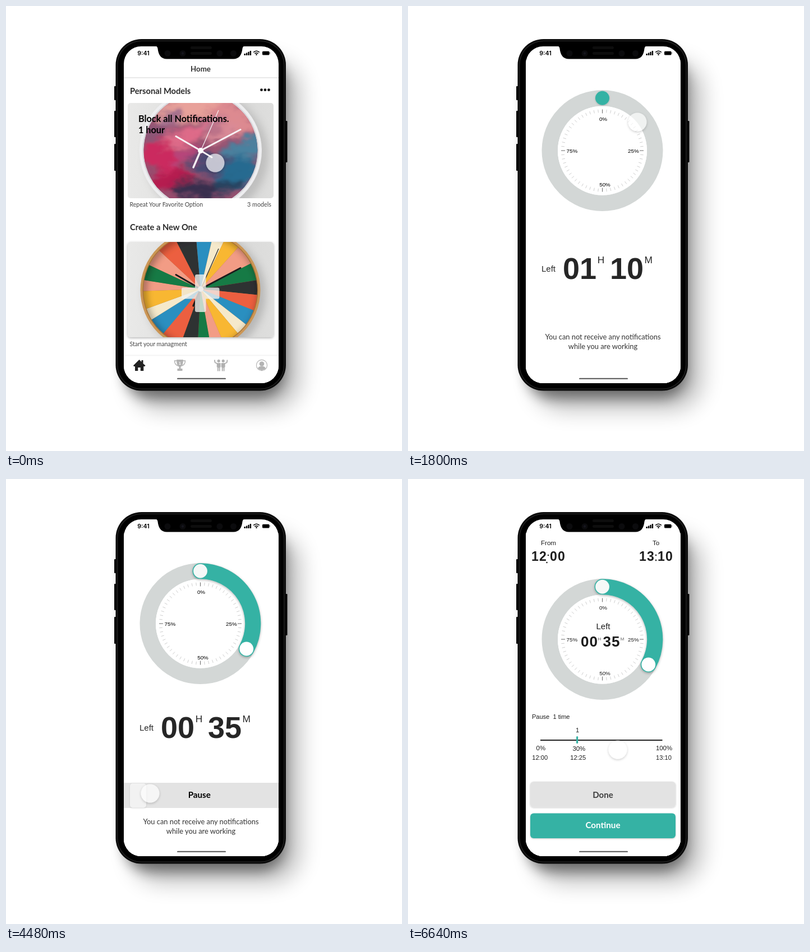
An HTML page that plays this animation: 706 by 794 pixels, repeating every 6680 ms.

```html
<!DOCTYPE html>
<html lang="en">
<head>
<meta charset="utf-8">
<title>Focus timer</title>
<style>
html, body { margin: 0; width: 100%; height: 100%; overflow: hidden; background: #fff; }
svg { display: block; width: 706px; height: 794px; }
.lato { font-family: Lato, sans-serif; }
.sans { font-family: "Liberation Sans", Arial, sans-serif; }
.bold { font-weight: 700; }
</style>
</head>
<body>
<svg id="stage" viewBox="0 0 706 794" xmlns="http://www.w3.org/2000/svg"></svg>
<script>
const LOOP = 6680, TEAL = '#35b2a4', INK = '#262626';
const CX = 346.5, CY = 258, RING = 93.75, SWEEP = 118.7;

const text = (x, y, size, str, cls = 'sans', extra = '') =>
  `<text x="${x}" y="${y}" font-size="${size}" class="${cls}" ${extra}>${str}</text>`;
const circle = (x, y, r, fill, extra = '') => `<circle cx="${x}" cy="${y}" r="${r}" fill="${fill}" ${extra}/>`;
const rect = (x, y, w, h, r, fill, extra = '') =>
  `<rect x="${x}" y="${y}" width="${w}" height="${h}" rx="${r}" fill="${fill}" ${extra}/>`;
const line = (x1, y1, x2, y2, w, color, extra = '') =>
  `<path d="M${x1} ${y1}L${x2} ${y2}" stroke="${color}" stroke-width="${w}" ${extra}/>`;
const middle = 'text-anchor="middle"', end = 'text-anchor="end"', round = 'stroke-linecap="round"';

function polar(deg, r, x = CX, y = CY) {
  const a = deg * Math.PI / 180;
  return [x + r * Math.sin(a), y - r * Math.cos(a)];
}
function arcPath(deg) {
  const [x, y] = polar(deg, RING);
  return `M${CX} ${CY - RING}A${RING} ${RING} 0 0 1 ${x} ${y}`;
}

function wedges() {
  const color = { d: '#2f3032', b: '#2c8fc0', c: '#f5e9cb', y: '#f8b732', p: '#f29c85', g: '#167a45', r: '#ec5f3f' };
  const order = 'dbcypgdrbcypgdrbcypgpr';
  const ends = [-5, 13, 26, 42, 63, 81, 96, 112, 128, 140, 157, 170, 183, 200, 220, 238, 250, 268, 279, 295, 313, 333];
  let from = -27;
  return ends.map((to, i) => {
    const a = polar(from, 120, 347, 505), b = polar(to, 120, 347, 505);
    from = to;
    return `<path d="M347 505L${a}L${b}Z" fill="${color[order[i]]}"/>`;
  }).join('');
}

function paintedFace() {
  const blob = (x, y, rx, ry, fill, tilt = 0) =>
    `<ellipse cx="${x}" cy="${y}" rx="${rx}" ry="${ry}" fill="${fill}" transform="rotate(${tilt} ${x} ${y})"/>`;
  return `<g clip-path="url(#face)">${circle(347, 258, 102, '#96506f')}<g filter="url(#wisps)">` +
    blob(330, 182, 62, 22, '#e8a19a', -10) + blob(405, 200, 42, 26, '#dd8a90', 30) +
    blob(290, 205, 26, 12, '#a5728f', -35) + blob(360, 212, 34, 10, '#c37b92', -20) +
    blob(264, 228, 24, 20, '#8d5476', -30) + blob(315, 235, 42, 17, '#de6a88', -20) +
    blob(385, 226, 40, 9, '#d98a97', -25) + blob(275, 270, 38, 24, '#cb2a5f', 20) +
    blob(320, 268, 26, 12, '#b8457a', -20) + blob(295, 312, 42, 20, '#b51d4f', -15) +
    blob(425, 255, 44, 20, '#4a819f', -20) + blob(375, 285, 48, 20, '#4a4a72', 8) +
    blob(415, 300, 36, 26, '#286a90', -30) + blob(345, 328, 48, 16, '#392f4e', 5) +
    blob(395, 322, 30, 12, '#28435f', -20) + '</g></g>';
}

function hands(color, cy) {
  return line(347, cy, 303, cy - 25.5, 3, color, round) + line(347, cy, 418, cy - 37.5, 3, color, round) +
    line(342, cy + 12, 379, cy - 72, 1.2, color) + line(347, cy, 334, cy + 30, 3.4, color, round);
}

function tabIcons() {
  const person = (x, side) => circle(x, 633.3, 2.6, '#b0b0b0') +
    `<path d="M${x - 3.4} 637h6.800v7.500h-1v7h-1.900v-6h-1v6h-1.900v-7h-1z" fill="#b0b0b0"/>
     <path d="M${x + side * 2.6} 638.300L${x + side * 6.6} 636l${side * 0.8} -4.500" fill="none" stroke="#b0b0b0" stroke-width="1.900"/>`;
  return `<path d="M227 641.5L237.5 631l4 4v-3h3v6l4 3.500-1.200 1.500h-2V651h-5.500v-6h-4.500v6H230v-8h-2z" fill="#222"/>
    <g fill="none" stroke="#b3b3b3" stroke-width="1.500"><path d="M304 633h-3.500q0 7 6 9M316 633h3.500q0 7-6 9"/></g>
    <path d="M304 631h12q0 11-4.500 13v3h3v4h-9v-4h3v-3Q304 642 304 631z" fill="#b3b3b3"/>
    ${text(310, 640, 7, '1', 'sans bold', middle + ' fill="#fff"')}
    ${person(379.2, -1)}${person(387.2, 1)}
    ${circle(456, 641, 9.6, 'none', 'stroke="#b3b3b3" stroke-width="1.100"')}
    ${circle(456, 638.5, 4.3, '#b3b3b3')}<path d="M449 647q1-4 5-4.300h4q4 .3 5 4.300-7 6-14 0z" fill="#b3b3b3"/>`;
}

function homePage() {
  return rect(210, 72, 276, 602, 0, '#fff') +
    text(347, 117, 13.3, 'Home', 'lato bold', middle + ' fill="#333"') +
    rect(210, 127.5, 276, 1, 0, '#d3d3d3') +
    text(221, 156.6, 14.7, 'Personal Models', 'lato bold', 'fill="#2b2b2b"') +
    [455.5, 462, 468.5].map(x => circle(x, 149.7, 2.4, '#111')).join('') +
    `<g clip-path="url(#card1)">${rect(217, 173, 260, 170, 0, 'url(#wall)')}
      ${circle(358, 266, 110, '#8b8b8b', 'opacity=".35" filter="url(#haze)"')}
      ${circle(347, 258, 109, '#eeeef0')}${circle(347, 258, 104, '#d9d8dc')}${paintedFace()}
      ${hands('#f7f1f4', 258)}${line(347, 258, 367, 270, 3, '#f7f1f4', round)}${circle(347, 258, 5, '#fff')}</g>` +
    text(236, 207, 16.2, 'Block all Notifications.', 'lato bold') +
    text(236, 227, 16.2, '1 hour', 'lato bold') +
    text(220.5, 358, 10.55, 'Repeat Your Favorite Option', 'lato', 'fill="#444"') +
    text(473, 358, 10.8, '3 models', 'lato', end + ' fill="#444"') +
    text(221, 399.6, 14.7, 'Create a New One', 'lato bold', 'fill="#2b2b2b"') +
    `<g filter="url(#lift)"><g clip-path="url(#card2)">${rect(217, 421, 260, 170, 0, 'url(#wall)')}
      ${circle(355, 514, 108, '#777', 'opacity=".35" filter="url(#haze)"')}
      ${circle(346.5, 507, 107, '#cb9656')}${circle(346.5, 507, 103, '#a87336')}
      <g clip-path="url(#wheel)">${wedges()}
      ${circle(350, 510, 107, 'none', 'stroke="#000" stroke-width="12" opacity=".4" filter="url(#haze)"')}</g>
      ${hands('#1c1c1c', 505)}${circle(347, 505, 5, '#ddd')}
      <path d="M340 479h13.500q3 0 3 3v20.500h21q3 0 3 3v14q0 3-3 3h-21V543q0 3-3 3H340q-3 0-3-3v-20.500h-21q-3 0-3-3v-14q0-3 3-3h21V482q0-3 3-3z" fill="#f3f3f0" opacity=".78"/>
    </g></g>` +
    text(220.5, 607, 10.55, 'Start your managment', 'lato', 'fill="#444"') +
    rect(210, 624.5, 276, 50, 0, '#fff', 'filter="url(#lift)"') + tabIcons();
}

function dial(arc) {
  let ticks = '';
  for (let i = 0; i < 60; i++) {
    const major = i % 15 === 0;
    ticks += line(...polar(i * 6, major ? 66.5 : 68), ...polar(i * 6, 73.5), major ? 0.9 : 0.7, major ? '#555' : '#b9b9b9');
  }
  return circle(CX, CY, RING, 'none', 'stroke="#d3d7d6" stroke-width="28.500"') + circle(CX, CY, 79.5, '#fff') + ticks +
    text(348, 205, 9.8, '0%', 'sans', middle) + text(351, 321.5, 9.8, '50%', 'sans', middle) +
    text(282.5, 261.5, 9.8, '75%') + text(392, 261.5, 9.8, '25%') + arc;
}
const arcShape = d => `<path d="${d}" fill="none" stroke="${TEAL}" stroke-width="28" ${round} filter="url(#lift)"/>`;
const knob = (x, y, fill = '#fff', id = '') => circle(x, y, 12.4, fill, id);

function timerPage() {
  const big = (x, str) => text(x, 487, 54, str, 'sans bold');
  const growing = circle(CX, CY - RING, 12.5, TEAL, 'filter="url(#soft)"') +
    `<g id="grow">${arcShape(arcPath(0.1)).replace('<path', '<path id="arc"')}
     ${knob(CX, CY - RING, '#f5f8f7')}${knob(CX, CY - RING, '#fff', 'id="tip"')}</g>`;
  return rect(210, 96, 276, 578, 0, '#fff') + dial(growing) +
    `<g id="counter" fill="${INK}">${text(238, 473.5, 15, 'Left')}${big(276, '0')}
      <g id="before">${big(306, '1')}${big(360, '10')}</g><g id="after">${big(306, '0')}${big(360, '35')}</g>
      ${text(337.8, 459, 17.3, 'H')}${text(421.5, 459, 17.3, 'M')}</g>
    <g id="bar">${rect(210, 542, 276, 45, 0, '#e3e3e3')}
      ${rect(221, 543, 29, 43.5, 5, '#fff', 'opacity=".55" filter="url(#soft)"')}
      ${text(344.8, 569, 15.2, 'Pause', 'lato bold', middle)}</g>
    <g id="note" fill="#333">${text(347.5, 595, 12.85, 'You can not receive any notifications', 'lato', middle)}
      ${text(347.5, 612, 12.85, 'while you are working', 'lato', middle)}</g>`;
}

function summaryPage() {
  const clock = (x, hour, min) => text(x, 146, 23, hour, 'sans bold', 'letter-spacing="1.2"') +
    text(x + 33, 146, 23, min, 'sans bold', 'letter-spacing="1.2"');
  const arc = arcShape(arcPath(SWEEP)) + knob(CX, CY - RING, '#f5f8f7') + knob(...polar(SWEEP, RING));
  const mid = (x, y, size, str) => text(x, y, size, str, 'sans', middle);
  return rect(210, 96, 276, 578, 0, '#fff') + `<g fill="#1c1c1c">` +
    mid(250.5, 118, 11.6, 'From') + mid(442, 118, 11.6, 'To') +
    clock(220, '12', '00') + circle(250, 136, 1.3, '#222') + circle(247.5, 149, 1.3, '#222') +
    clock(412, '13', '10') + circle(442, 136, 1.4, '#333') + circle(442, 145, 1.4, '#333') +
    `<g transform="translate(0 28)">${dial(arc)}</g>` +
    mid(348, 267.5, 15, 'Left') +
    text(308, 299, 26, '00', 'sans bold', 'letter-spacing="1"') + text(347.5, 299, 26, '35', 'sans bold', 'letter-spacing="1"') +
    text(338.5, 288, 8, 'H', 'sans', 'fill="#666"') + text(378.7, 288, 8, 'M', 'sans', 'fill="#666"') +
    text(221, 427.5, 11, 'Pause') + text(258.5, 427.5, 11, '1 time') +
    mid(302, 452, 11, '1') + line(236, 466, 453.5, 466, 2, '#222') + rect(300, 459, 3.2, 13, 1.5, TEAL) +
    mid(236.8, 484, 11.4, '0%') + mid(304.8, 485, 11.4, '30%') + mid(456.5, 484, 11.4, '100%') +
    mid(235.2, 501, 11.1, '12:00') + mid(303.2, 501, 11.1, '12:25') + mid(456, 501, 11.1, '13:10') +
    rect(218, 540, 259, 45.5, 6, '#e3e3e3', 'filter="url(#soft)"') +
    rect(218, 596.5, 259, 44.5, 6, TEAL, 'filter="url(#soft)"') +
    text(347.5, 569, 15, 'Done', 'lato bold', middle + ' fill="#3d3d3d"') +
    text(347.5, 623, 15.2, 'Continue', 'lato bold', middle + ' fill="#fff"') + '</g>';
}

function statusBar() {
  const bars = [3, 4.5, 6.2, 8].map((h, i) => rect(424.5 + i * 3.4, 88 - h, 2.4, h, 0.6, '#000')).join('');
  return text(245, 88.3, 10.7, '9:41', '', `${middle} font-family="Inter, sans-serif" font-weight="600"`) + bars +
    `<g fill="none" stroke="#000" stroke-width="1.500"><path d="M441.200 82.600q5.300-4.600 10.600 0M443.300 85q3.200-2.600 6.400 0"/></g>
    ${circle(446.5, 86.8, 1.3, '#000')}${rect(457, 80.8, 12.5, 6.6, 1.5, '#000')}${rect(470, 82.8, 1, 2.6, 0.4, '#777')}`;
}

function phone() {
  const button = (x, y, h) => rect(x, y, 4, h, 1, '#050505');
  return rect(226, 100, 296, 618, 50, '#000', 'opacity=".28" filter="url(#far)"') +
    rect(210, 90, 287, 610, 46, '#000', 'opacity=".42" filter="url(#near)"') +
    button(193, 143, 25) + button(193, 187, 47) + button(193, 246, 48) + button(497.5, 205, 74) +
    rect(195.5, 59, 303.5, 627.5, 46, '#0a0a0a') +
    rect(198.8, 62.3, 296.9, 620.9, 43, '#000', 'stroke="#262626" stroke-width="1.200"');
}

function notch() {
  return `<path d="M264 71q6 0 6.500 5 2 18.500 16 18.500h119q14 0 16-18.500 .5-5 6.500-5z" fill="#000"/>` +
    [288, 315, 381, 405.5].map(x => circle(x, 84.5, 5.5, '#0b0b0d')).join('') + circle(315, 84.5, 2.2, '#15151c') +
    rect(329, 72, 38, 5, 2.5, '#0d0d0d') + rect(329, 82, 38, 5, 2.5, '#0d0d0d');
}

const blur = (id, s) => `<filter id="${id}" x="-50%" y="-50%" width="200%" height="200%"><feGaussianBlur stdDeviation="${s}"/></filter>`;
const shadow = (id, dy, s, a) => `<filter id="${id}" x="-30%" y="-30%" width="160%" height="160%">
  <feDropShadow dx="0" dy="${dy}" stdDeviation="${s}" flood-opacity="${a}"/></filter>`;
const clip = (id, shape) => `<clipPath id="${id}">${shape}</clipPath>`;

document.getElementById('stage').innerHTML = `<defs>
  ${blur('far', 20)}${blur('near', 11)}${blur('haze', 7)}
  <filter id="wisps" x="-20%" y="-20%" width="140%" height="140%"><feGaussianBlur stdDeviation="6" result="soft"/>
    <feTurbulence type="fractalNoise" baseFrequency=".03 .05" numOctaves="3" seed="4"/>
    <feDisplacementMap in="soft" scale="34" xChannelSelector="R" yChannelSelector="G"/></filter>
  ${shadow('soft', 1, 1.4, 0.22)}${shadow('lift', 1.5, 2, 0.3)}
  ${clip('screen', rect(210, 72, 276, 601, 31, '#000'))}
  ${clip('card1', rect(217, 173, 260, 170, 5, '#000'))}${clip('card2', rect(217, 421, 260, 170, 5, '#000'))}
  ${clip('face', circle(347, 258, 101.5, '#000'))}${clip('wheel', circle(346.5, 507, 101.5, '#000'))}
  <linearGradient id="wall"><stop offset="0" stop-color="#e9e9e8"/><stop offset=".7" stop-color="#d8d8d7"/><stop offset="1" stop-color="#dededd"/></linearGradient>
  </defs>
  ${rect(0, 0, 706, 794, 0, '#fff')}${phone()}
  <g clip-path="url(#screen)">
    <g id="home">${homePage()}</g><g id="timer">${timerPage()}</g><g id="summary">${summaryPage()}</g>
    ${rect(305, 663.7, 87, 2.4, 1.2, '#666')}${statusBar()}
  </g>${notch()}
  <g id="touch"><g filter="url(#lift)" opacity=".68">${circle(0, 0, 16.5, '#fff')}</g></g>`;

const el = {};
document.querySelectorAll('#stage g[id], #arc, #tip').forEach(node => el[node.id] = node);

const ease = (t, from, to) => {
  const u = Math.min(1, Math.max(0, (t - from) / (to - from)));
  return u * u * (3 - 2 * u);
};
// start, end, x, y, sideways bulge
const moves = [
  [700, 1320, 409, 207, 0], [2080, 2720, 428, 303, 20], [2860, 3420, 343, 435, 0],
  [3800, 4380, 257, 561, 0], [4600, 5300, 392, 564, 0], [6160, 6640, 374, 483, 0]
];
function touchAt(t) {
  let x = 373, y = 280;
  for (const [from, to, nx, ny, bulge] of moves) {
    const u = ease(t, from, to);
    x += (nx - x) * u + bulge * Math.sin(Math.PI * u);
    y += (ny - y) * u;
  }
  return [x, y];
}
const fade = (node, value) => {
  node.setAttribute('opacity', value);
  node.setAttribute('visibility', value > 0 ? 'visible' : 'hidden');
};
const move = (node, x, y) => node.setAttribute('transform', `translate(${x} ${y})`);

function render(t) {
  const grow = ease(t, 2100, 2720), swap = ease(t, 2250, 2550), open = ease(t, 3580, 3900);
  fade(el.timer, ease(t, 241, 531));
  fade(el.summary, ease(t, 5440, 5730));
  fade(el.grow, Math.min(1, grow * 8));
  fade(el.before, 1 - swap);
  fade(el.after, swap);
  fade(el.bar, open);
  el.arc.setAttribute('d', arcPath(Math.max(0.1, SWEEP * grow)));
  const [tx, ty] = polar(SWEEP * grow, RING);
  el.tip.setAttribute('cx', tx);
  el.tip.setAttribute('cy', ty);
  move(el.counter, 0, -25 * open);
  move(el.note, 0, 21 * open);
  move(el.touch, ...touchAt(t));
}

const start = performance.now();
function tick() {
  render((performance.now() - start) % LOOP);
  requestAnimationFrame(tick);
}
render(0);
requestAnimationFrame(tick);
</script>
</body>
</html>
```
